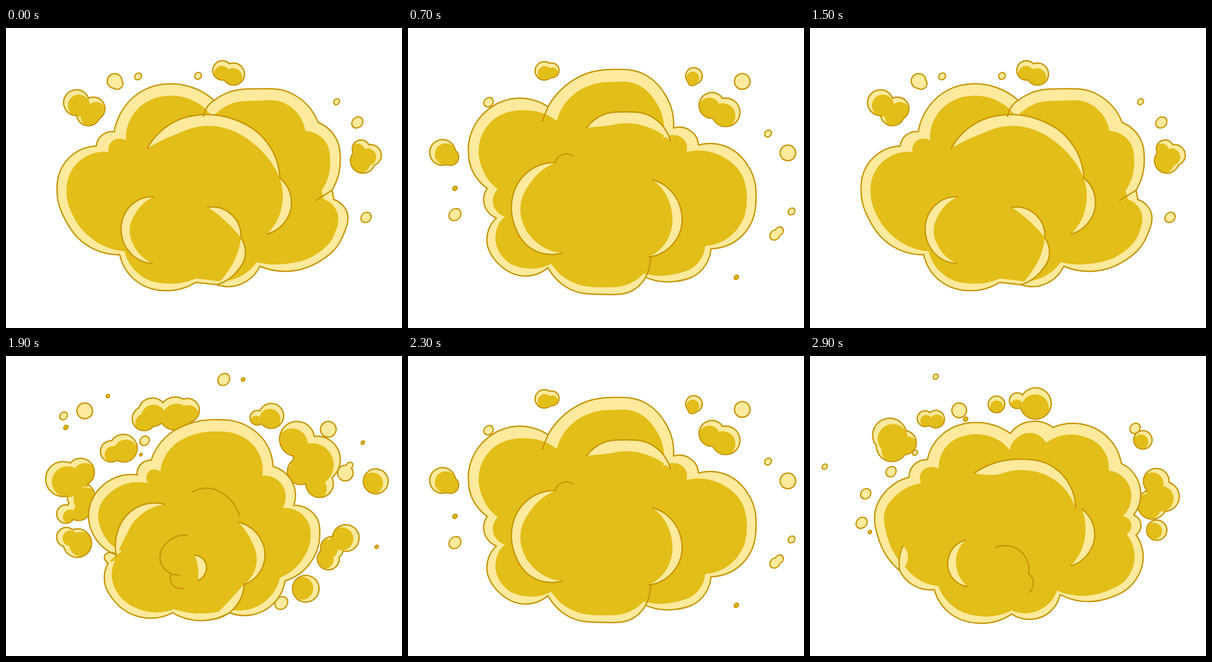
An HTML page with a canvas for the animation above (3000 ms loop, 860 by 651 pixels).

```html
<!DOCTYPE html>
<html lang="en">
<head>
<meta charset="utf-8">
<title>Dust cloud</title>
<style>
html, body { margin: 0; height: 100%; overflow: hidden; background: #fff; }
canvas { display: block; }
</style>
</head>
<body>
<canvas id="stage" width="860" height="651"></canvas>
<script>
const LIGHT = '#feea9d', GOLD = '#e2be18', LINE = '#c89608';
const MID = [430, 370], FOOT = [430, 577];
const ctx = document.getElementById('stage').getContext('2d');

// cloud: lobes, clockwise, "/" at the notch between two lobes
// folds: arcs inside the cloud, clockwise; "-" marks a plain line
// puffs: each is one or more circles "x,y,r"
const swell = {
  cloud: '247,492 180,474 128,415 111,358 124,298 196,256/214,229 235,225/255,175 305,132 355,121 410,131 452,157/475,143 545,132 620,142 678,205/717,240 726,285 708,352/712,372/737,392 730,455 680,507 610,528 551,517/520,551 458,557/412,552/350,570 295,557',
  folds: ['307,261 350,213 430,188 500,200 560,240 595,326', '594,325 620,380 567,447',
    '318,511 262,478 250,440 265,392 321,366', '438,389 490,405 510,455',
    '510,455 520,490 500,530 458,557', '-452,157 438,170 429,192', '-708,352 673,374'],
  puffs: '153,162,28 190,175,25 179,186,26;236,115,16 243,122,12;287,105,8;417,104,8;470,92,21 494,100,24;718,160,7;763,205,13;771,262,19 792,276,23 775,288,27;782,411,12'
};
const burst = {
  cloud: '238,431 192,392 182,325 215,277 285,258/295,233 315,226/345,178 395,148 455,138 520,150 565,190 580,240/615,263 625,324/672,347 681,395 660,450 606,488/580,538 485,557/430,574 362,557/290,566 230,525 214,490 222,449/214,434',
  folds: ['240,435 241,385 270,338 345,322', '505,361 550,392 562,440 517,496',
    '517,495 508,530 445,572', '410,432 434,450 417,487', '-405,295 440,287 480,305 507,347',
    '-377,475 345,463 335,430 355,400 393,389', '-385,504 360,494 358,474'],
  puffs: '318,122,31 300,136,26 368,125,36 394,118,26;228,207,23 255,200,30;301,184,11;293,214,3;124,267,38 162,252,30 163,305,30 158,332,25 130,343,20;131,393,21 155,406,31;221,87,4;171,119,17;125,130,9;130,155,5;473,51,14;515,51,4;546,134,16 576,130,27;632,180,38 675,225,51 640,250,29 681,277,30;700,159,17;775,188,4;737,254,17 746,238,8;803,272,27;738,395,29 708,417,25 700,440,24;651,505,29;598,536,15;805,414,4'
};
const bloom = {
  cloud: '172,348 140,310 131,262 160,190 262,154 304,171/340,127 390,98 445,90 510,99 560,147 577,217/612,222 631,254/690,257 742,305 756,370 735,440 658,479/635,528 580,550 516,541/495,565 420,578 345,563 304,520/260,538 200,515 172,450 192,412/165,380',
  folds: ['388,216 420,190 470,182 530,193 570,245', '335,488 270,480 232,430 225,380 250,322 320,292',
    '531,329 590,385 585,455 523,497', '-320,292 330,277 357,277', '-304,171 291,203', '-527,497 525,515 516,541'],
  puffs: '296,93,20 312,92,16;175,161,11;75,270,28 92,280,18;102,348,5;102,405,14;621,104,18 619,114,12;726,116,17;660,168,28 690,183,31;782,229,8;825,271,17;833,398,8;797,449,12 806,441,10;713,541,5'
};
const shed = {
  cloud: '222,475 185,425 174,345 195,305 225,283/245,240 286,227/320,183 370,168 412,180/442,155 490,147 560,180/620,175 655,215 652,252/690,260 703,300/712,370/717,390 700,405/704,440 690,495 640,525 537,530/520,562 455,566/380,581 320,558 287,521/255,512',
  folds: ['397,272 440,258 500,268 553,325', '577,332 611,390 595,440 550,467', '389,485 358,475 360,442 383,427',
    '222,474 216,430 236,390', '-405,444 427,470 415,500', '-475,540 455,566'],
  puffs: '450,106,23 500,112,36 478,122,25;183,182,35 212,205,33 165,215,34;180,267,25;280,165,30 312,166,18;338,144,21 335,165,15;403,109,21 383,108,10;53,248,15;77,270,6;150,318,16 136,320,9;150,382,22 157,360,15;75,409,3;174,439,8;279,62,14;304,61,4;638,72,8;737,93,7;656,147,7;701,170,25;733,274,28 752,320,35 738,352,35;857,267,5;825,451,6'
};
const drift = {
  cloud: '195,466 150,400 145,325 170,288 215,263/225,237 255,225/285,172 330,148 375,145 435,168/480,142 528,155/600,150 650,180 676,233/712,270 703,345/718,362 708,388/722,420 700,495 650,525 543,518/520,556 438,560/370,580 300,555 270,507/222,496',
  folds: ['357,254 390,236 450,224 530,242 577,330', '590,332 618,380 567,455', '342,500 305,475 300,440 338,399',
    '195,466 194,440 202,412', '-404,415 455,422 475,472', '-475,472 485,495 476,513'],
  puffs: '173,172,37 205,188,26 178,195,34;228,210,6;250,136,17 273,137,19;324,118,16;338,137,5;405,105,18;450,97,17 490,103,34;273,45,6;32,240,6;176,251,12;121,299,12;112,362,13;130,382,4;706,157,12;723,182,20;752,272,28 770,305,32 743,322,32;753,378,22'
};

// Poses: cloud scale, then [spread from the middle, size] for small and big puffs.
const rest = { cloud: [1, 1], small: [1, 1], big: [1, 1] };
const split = { cloud: [1.06, 1.04], small: [.96, 1.5], big: [.92, 1.15] };
const rise = { cloud: [.9, .95], small: [.96, 1.25], big: [.96, 1.25] };
const steps = [[swell, rest], [burst, split], [burst, rest], [bloom, rise],
  [bloom, rest], [shed, split], [shed, rest], [drift, rest]];

const points = text => text.split(' ').map(p => p.split(',').map(Number));
const rim = y => 29 - y / 42;    // light comes from above
const notch = y => 48 - y / 14;

function toward([x, y], [tx, ty], dist) {
  const k = dist / (Math.hypot(tx - x, ty - y) || 1);
  return [x + (tx - x) * k, y + (ty - y) * k];
}

// Inner points of an arc move to its inner side by the rim width.
function inset(arc) {
  return arc.map((p, i) => {
    if (!i || i === arc.length - 1) return p;
    const [a, b] = [arc[i - 1], arc[i + 1]];
    return toward(p, [p[0] - b[1] + a[1], p[1] + b[0] - a[0]], rim(p[1]));
  });
}

// Circle-like curve through the points, going on from the first one.
function spline(path, pts) {
  const chords = pts.slice(1).map((p, i) => {
    const x = p[0] - pts[i][0], y = p[1] - pts[i][1];
    return { x, y, len: Math.hypot(x, y) || 1 };
  });
  const dirs = pts.map((_, i) => {
    const a = chords[i - 1], b = chords[i];
    if (!a || !b) return null;
    const x = a.x / a.len ** 2 + b.x / b.len ** 2, y = a.y / a.len ** 2 + b.y / b.len ** 2;
    const len = Math.hypot(x, y) || 1;
    return [x / len, y / len];
  });
  const mirror = (d, c) => {
    if (!d) return [c.x / c.len, c.y / c.len];
    const k = 2 * (d[0] * c.x + d[1] * c.y) / c.len ** 2;
    return [k * c.x - d[0], k * c.y - d[1]];
  };
  dirs[0] = mirror(dirs[1], chords[0]);
  dirs[pts.length - 1] = mirror(dirs.at(-2), chords.at(-1));
  chords.forEach(({ len }, i) => {
    const [a, b, u, v] = [pts[i], pts[i + 1], dirs[i], dirs[i + 1]], k = len * .36;
    path.bezierCurveTo(a[0] + u[0] * k, a[1] + u[1] * k, b[0] - v[0] * k, b[1] - v[1] * k, ...b);
  });
}

function trace(arcs) {
  const path = new Path2D();
  path.moveTo(...arcs[0][0]);
  arcs.forEach(arc => spline(path, arc));
  return path;
}

function makeCloud(text) {
  const runs = text.split('/').map(points);
  const lobes = runs.map((run, i) => [...(i ? [runs[i - 1].at(-1)] : []), ...run]);
  lobes.at(-1).push(runs[0][0]);
  const tip = p => toward(p, MID, notch(p[1]));
  const shade = lobes.map(lobe => [tip(lobe[0]), ...inset(lobe).slice(1, -1), tip(lobe.at(-1))]);
  return { outline: trace(lobes), shade: trace(shade) };
}

function makeFold(text) {
  const plain = text[0] === '-', arc = points(text.slice(plain));
  return { edge: trace([arc]), light: !plain && trace([arc, inset(arc).reverse()]) };
}

for (const d of [swell, burst, bloom, shed, drift]) {
  d.cloud = makeCloud(d.cloud);
  d.folds = d.folds.map(makeFold);
  d.puffs = d.puffs.split(';').map(points);
}

function fill(path, color) {
  ctx.fillStyle = color;
  ctx.fill(path);
}

function clipped(path, draw) {
  ctx.save();
  ctx.clip(path);
  draw();
  ctx.restore();
}

function blob(circles, grow, dx = 0, dy = 0) {
  const path = new Path2D();
  for (const [x, y, r] of circles) {
    const a = Math.max(r + grow, .5), b = r < 16 ? a * .85 : a;
    const one = new Path2D();
    one.ellipse(x + dx, y + dy, a, b, -.8, 0, 7);
    path.addPath(one);
  }
  return path;
}

function drawPuff(puff, pose) {
  const size = Math.max(...puff.map(c => c[2]));
  const [spread, scale] = size < 22 ? pose.small : pose.big;
  const mean = k => puff.reduce((sum, c) => sum + c[k], 0) / puff.length;
  const from = [mean(0), mean(1)], to = from.map((v, k) => MID[k] + (v - MID[k]) * spread);
  const circles = puff.map(([x, y, r]) =>
    [to[0] + (x - from[0]) * scale, to[1] + (y - from[1]) * scale, r * scale]);
  const inner = blob(circles, -1.5);
  fill(blob(circles, 1.5), LINE);
  fill(inner, size < 6 ? GOLD : LIGHT);
  if (size < 18) return;
  const [x, y] = toward(to, [430, 480], size * scale * .3);
  clipped(inner, () => fill(blob(circles, -4, x - to[0], y - to[1]), GOLD));
}

function drawCloud({ cloud, folds }, [sx, sy]) {
  ctx.save();
  ctx.translate(...FOOT);
  ctx.scale(sx, sy);
  ctx.translate(-FOOT[0], -FOOT[1]);
  fill(cloud.outline, LIGHT);
  clipped(cloud.outline, () => fill(cloud.shade, GOLD));
  for (const { light, edge } of folds) {
    if (light) fill(light, LIGHT);
    ctx.stroke(edge);
  }
  ctx.stroke(cloud.outline);
  ctx.restore();
}

ctx.strokeStyle = LINE;
ctx.lineWidth = 3;
ctx.lineCap = ctx.lineJoin = 'round';

function tick() {
  const t = performance.now() % 3000;
  const [d, pose] = steps[Math.floor((t + 100) / 200) % steps.length];
  ctx.clearRect(0, 0, 860, 651);
  d.puffs.forEach(puff => drawPuff(puff, pose));
  drawCloud(d, pose.cloud);
  requestAnimationFrame(tick);
}
tick();
</script>
</body>
</html>
```
